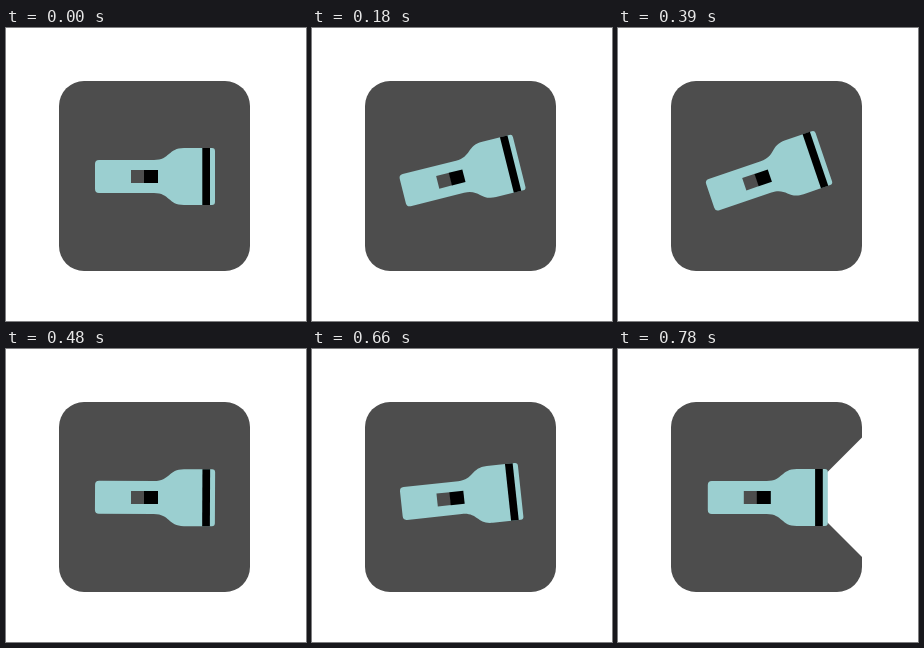
Recreate the animation shown at these times as an HTML page. Size 300 by 293 pixels, loop 4.91 s.

```html
<!DOCTYPE html>
<html lang="en">
<head>
<meta charset="utf-8">
<title>Flashlight</title>
<style>
  html, body { margin: 0; width: 100%; height: 100%; overflow: hidden; background: #fff; }
  svg { display: block; width: 100vw; height: 100vh; }
</style>
</head>
<body>
<svg viewBox="0 0 300 293">
  <rect x="53" y="53" width="191" height="190" rx="25" fill="#4d4d4d"/>
  <path id="beam" d="M209 123.5L244.5 88V208.5L209 173Z" fill="#fff"/>
  <g id="torch">
    <path fill="#9bcfd0" d="M93 132H148C164 132 162 120 178 120H206Q209 120 209 123V174Q209 177 206 177H178C162 177 164 165 148 165H93Q89 165 89 161V136Q89 132 93 132Z"/>
    <rect x="196.3" y="120" width="7.7" height="57"/>
    <rect x="125" y="142" width="13.5" height="13" fill="#4d4d4d"/>
    <rect x="138" y="142" width="14" height="13"/>
  </g>
</svg>
<script>
const LOOP = 4910, STEP = 30, LIGHT_ON = 780;
const beam = document.getElementById('beam');
const torch = document.getElementById('torch');

const easeOut = p => 1 - (1 - p) ** 2;
const easeInOut = p => (1 - Math.cos(Math.PI * p)) / 2;
const linear = p => p;

// Swing segments: start ms, end ms, start angle, end angle, easing
const swings = [
  [0, 375, 0, -19.3, easeOut],
  [375, 575, -19.3, 17, easeInOut],
  [575, 720, 17, -19.5, easeInOut],
  [720, 780, -19.5, 0, linear]
];

function angleAt(t) {
  const swing = swings.find(s => t < s[1]);
  if (!swing) return 0;
  const [start, end, from, to, ease] = swing;
  return from + (to - from) * ease((t - start) / (end - start));
}

function draw(now) {
  const time = now % LOOP;
  const t = Math.floor(time / STEP) * STEP;
  const lit = t >= LIGHT_ON;
  beam.style.display = lit ? '' : 'none';
  torch.setAttribute('transform', lit ? 'translate(.8 0)' : `rotate(${angleAt(t)} 149 148.5)`);
}

const begin = performance.now();
function tick() {
  draw(performance.now() - begin);
  requestAnimationFrame(tick);
}
tick();
</script>
</body>
</html>
```
